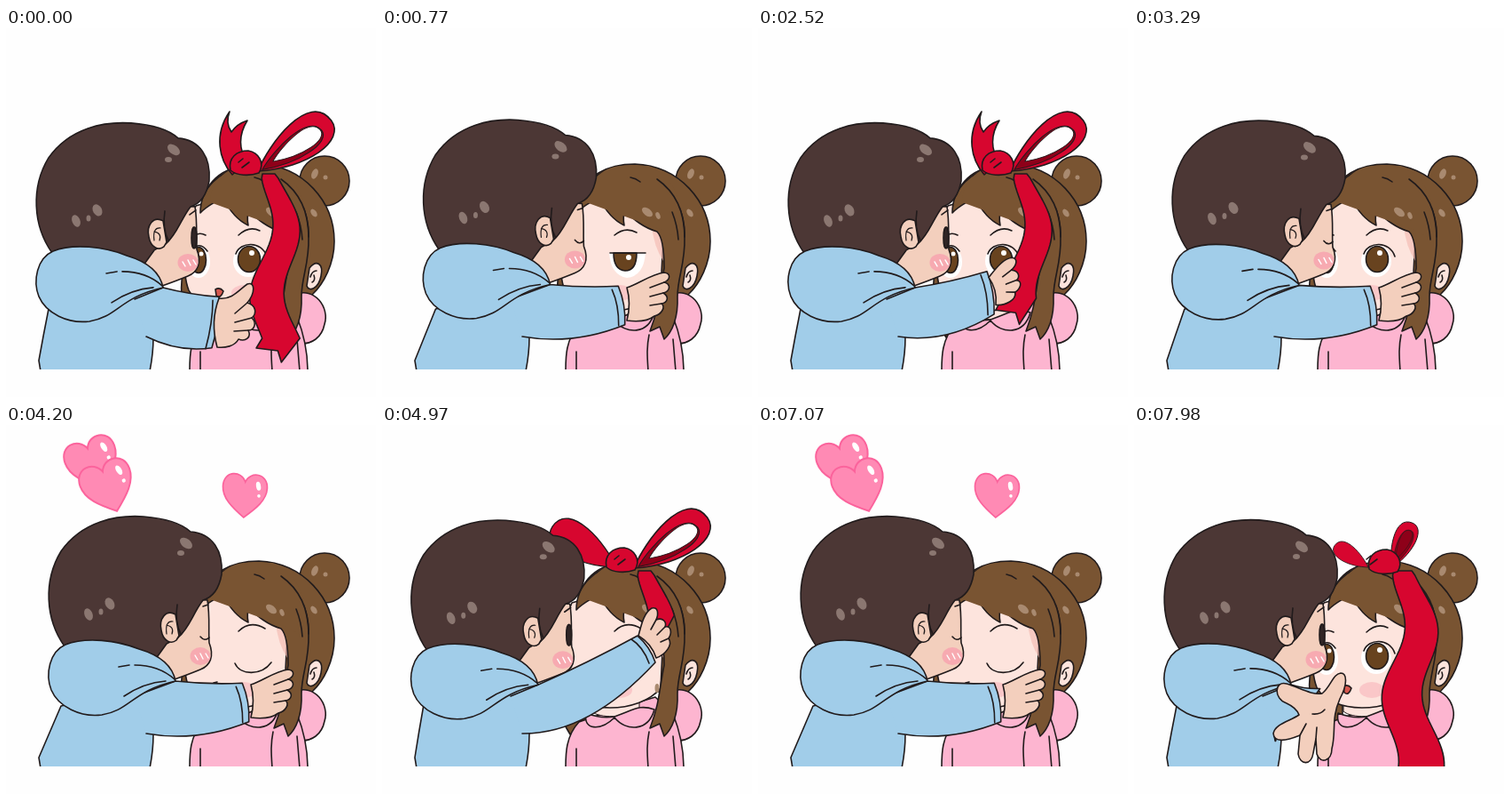
Animation, 417 px wide and 415 px high, one loop 8 s. Source, as an HTML page:

```html
<!DOCTYPE html>
<html lang="en">
<head>
<meta charset="utf-8">
<title>Ribbon kiss</title>
<style>
html, body { margin: 0; width: 100%; height: 100%; overflow: hidden; background: #fefefe; }
svg { display: block; width: 100%; height: 100%; }
.ink { stroke: #211b1c; stroke-width: 1.6; stroke-linejoin: round; stroke-linecap: round; }
.line { fill: none; }
.hair { fill: #795432; }
.dark { fill: #4c3735; }
.skin { fill: #f3cfbd; }
.pale { fill: #fde4dd; }
.pink { fill: #fdb5d0; }
.blue { fill: #a1cde9; }
.red { fill: #d7062f; }
.wine { fill: #8e0019; }
.shine { fill: #a98a70; }
.gloss { fill: #8b7771; }
.blush { fill: #f7a3af; }
</style>
</head>
<body>
<svg viewBox="0 0 417 415">
<defs>
  <clipPath id="floor"><rect width="417" height="384"/></clipPath>
  <g id="heart">
    <path d="M0 25C-14 14-25 4-25-9C-25-27-5-28 0-15C5-28 25-26 25-9C25 4 14 14 0 25Z" fill="#ff8ab4" stroke="#fb639c" stroke-width="1.7"/>
    <ellipse cx="15" cy="-11" rx="2.6" ry="5" fill="#fff" transform="rotate(-12 15 -11)"/>
    <circle cx="16" cy="0" r="1.8" fill="#fff"/>
  </g>
  <path id="leaf" d="M0 0C25-20 95-50 100-8C103 20 50 25 0 0Z"/>
</defs>
<g clip-path="url(#floor)">
  <g id="girl" class="ink">
    <path class="hair" d="M200 270C194 300 200 330 212 348L235 330V270Z"/>
    <circle class="hair" cx="359" cy="172" r="28"/>
    <path class="hair" d="M222 195C228 165 255 153 285 153C335 155 370 195 370 240C370 265 358 288 345 300H300L230 240Z"/>
    <path class="pink" d="M325 300C348 290 365 315 359 333C356 348 345 356 330 355Z"/>
    <path class="pink" d="M222 334C207 350 207 370 207 386H340C340 365 336 345 328 325L308 306L262 320Z"/>
    <path class="pale" d="M236 304V322C245 330 275 330 290 320V300Z" stroke-width="1"/>
    <path class="pink" d="M230 324C226 344 247 344 262 329C275 345 300 345 307 320C290 314 285 320 262 328C250 330 240 328 230 324Z"/>
    <path class="line" d="M219 364V386M301 345C298 360 299 370 300 386M328 350L331 386"/>
    <path class="pale" d="M214 200C200 230 198 275 206 295C222 326 290 325 314 296L318 215L265 185Z"/>
    <g stroke="none">
      <ellipse class="blush" cx="268" cy="298" rx="14" ry="9" opacity=".45"/>
      <path d="M304 222L318 230L317 262Q306 245 304 222Z" fill="#f4bdb5" opacity=".7"/>
    </g>
    <g id="eyesOpen">
      <ellipse cx="273" cy="262" rx="17" ry="18" fill="#fff" stroke="none"/>
      <ellipse cx="217" cy="263" rx="13" ry="18" fill="#fff" stroke="none"/>
      <ellipse cx="274" cy="260" rx="12.5" ry="14.5" fill="#68431f"/>
      <ellipse cx="217" cy="261" rx="8.5" ry="14.5" fill="#68431f"/>
      <circle cx="277" cy="253" r="3" fill="#fff" stroke="none"/>
      <circle cx="220" cy="254" r="2.5" fill="#fff" stroke="none"/>
      <path class="line" d="M259 254C264 240 288 239 294 257M209 250Q218 239 227 251M262 233Q274 222 286 228M211 234Q218 229 225 233"/>
      <path id="mouth" d="M236 294Q241 291 245 296Q242 305 237 301Z" fill="#d5574e"/>
    </g>
    <g id="eyesHalf">
      <path d="M256 253H297Q295 279 276 281Q258 278 256 253Z" fill="#fff" stroke="none"/>
      <path d="M261 253H287Q287 273 274 273Q261 272 261 253Z" fill="#68431f"/>
      <circle cx="278" cy="258" r="3" fill="#fff" stroke="none"/>
      <path class="line" d="M257 253H297M262 233Q274 223 287 230"/>
    </g>
    <path id="eyesClosed" class="line" d="M258 268C264 282 288 282 299 267M262 232Q275 219 292 229M234 290L238 289"/>
    <path class="pale" d="M342 270C350 260 358 265 355 279C352 294 341 297 339 290Z"/>
    <path class="line" d="M343 280Q345 273 350 273M345 286Q349 284 347 278"/>
    <path class="hair" d="M219 208C219 180 240 160 270 157C325 158 342 205 341 235C342 265 333 280 333 302C334 326 327 342 318 350L313 336L302 341C313 312 312 300 318 270C318 250 316 235 310 229C296 225 282 215 274 205Q271 213 273 222C258 215 250 202 244 190C237 196 227 199 219 208Z"/>
    <path d="M230 196C230 178 245 155 272 155H300C325 162 340 190 339 235L331 236L318 228Z" fill="#795432" stroke="none"/>
    <path class="line" d="M280 168Q286 169 291 173M310 170C330 184 341 205 341 235M327 207Q333 222 334 238"/>
    <g class="shine" stroke="none">
      <ellipse cx="299" cy="207" rx="7" ry="4" transform="rotate(38 299 207)"/>
      <ellipse cx="311" cy="211" rx="2.5" ry="4" transform="rotate(-20 311 211)"/>
      <ellipse cx="348" cy="164" rx="3.5" ry="6" transform="rotate(22 348 164)"/>
      <circle cx="360" cy="168" r="2.5"/>
      <ellipse cx="347" cy="208" rx="3" ry="5" transform="rotate(-35 347 208)"/>
      <ellipse cx="310" cy="296" rx="2.5" ry="5"/>
    </g>
  </g>

  <g id="ribbon" class="ink">
    <path id="tail" class="red"/>
    <g id="bow">
      <use id="leftLoop" href="#leaf" class="red"/>
      <path id="streamer" class="red" d="M255 165C240 148 234 120 252 94Q247 107 254 117Q260 108 272 104C262 120 262 137 272 150Z"/>
      <g id="rightLoop">
        <use href="#leaf" class="red"/>
        <use href="#leaf" class="wine" transform="translate(5 1) scale(.8 .6)"/>
        <use href="#leaf" id="hole" transform="translate(20 -1) scale(.64 .48)"/>
      </g>
      <path id="knot" class="red" d="M253 160C250 146 260 138 273 138C285 140 292 152 285 163C274 167 260 166 253 160Z"/>
      <path class="line" d="M262 151L267 147M266 157L274 151"/>
    </g>
  </g>

  <g id="head" class="ink">
    <path class="skin" d="M175 195L227 197C230 215 228 230 229 245C235 260 230 271 219 275Q207 280 190 286L140 250Z"/>
    <g stroke="none">
      <ellipse class="blush" cx="219" cy="260" rx="11.5" ry="10" opacity=".85"/>
      <path d="M213 259L216 264M219 257L222 263M225 257L228 262" stroke="#fff" stroke-width="1.4"/>
    </g>
    <path id="boyClosed" class="line" d="M219 238Q224 244 229 239M222 204L228 202"/>
    <g id="boyOpen"><ellipse cx="226" cy="232" rx="3" ry="12" fill="#302525"/><path class="line" d="M221 206L228 201"/></g>
    <path class="dark" d="M66 249C44 218 42 175 62 142C86 108 125 101 155 103C181 105 199 112 208 120C233 122 245 142 243 168C240 185 232 194 222 197C211 211 207 228 194 239L181 246L168 264L150 255Z"/>
    <path class="line" d="M193 202Q190 222 197 235"/>
    <path class="skin" d="M191 213C180 207 172 218 175 231C177 243 186 247 192 242L195 237Z"/>
    <path class="line" d="M188 221Q179 220 181 235M181 225Q190 227 187 235" stroke-width="1.2"/>
    <g class="gloss" stroke="none">
      <ellipse cx="203" cy="133" rx="8" ry="5" transform="rotate(38 203 133)"/>
      <ellipse cx="197" cy="144" rx="4" ry="3"/>
      <ellipse cx="93" cy="213" rx="4.5" ry="7" transform="rotate(-22 93 213)"/>
      <ellipse cx="107" cy="210" rx="2.5" ry="3.5"/>
      <ellipse cx="117" cy="201" rx="5" ry="7" transform="rotate(-28 117 201)"/>
    </g>
  </g>
  <g class="ink">
    <path id="torso" class="blue"/>
    <path id="sleeve" class="blue"/>
    <path id="cuff" class="line"/>
    <g id="hood">
      <path class="blue" d="M67 247C49 255 44 280 51 298C59 317 84 329 108 326C140 321 142 299 191 288C187 267 167 257 150 252C125 242 90 238 67 247Z"/>
      <path class="line" d="M127 272L139 270M145 270Q172 270 190 286M133 305Q155 290 180 288"/>
    </g>
    <g id="hand">
      <g id="handGrip">
        <path class="skin" d="M240 304C255 306 263 294 272 288C281 285 281 298 272 309C282 312 283 321 277 326C283 332 280 340 273 340C277 348 270 353 262 350C258 358 247 360 238 359Q230 330 240 304Z"/>
        <path class="line" d="M272 309L258 321M277 326L258 331M273 340L257 341"/>
      </g>
      <g id="handOpen">
        <path class="skin" d="M172 291C158 287 157 308 172 313Q183 318 186 326C176 333 159 336 157 347C158 358 172 355 187 349L185 370C187 383 200 383 202 369L205 353L206 370C210 382 223 378 223 364C228 345 222 330 232 308C241 291 240 279 233 279C224 280 222 294 212 302C200 304 186 295 172 291Z"/>
        <path class="line" d="M187 349L194 336M205 353L206 340M201 325Q210 326 215 320"/>
      </g>
      <g id="handCheek">
        <path class="skin" d="M276 292C289 288 303 277 318 275C326 276 325 283 318 286C326 288 325 296 317 298C324 302 322 309 315 310C320 314 315 322 307 324C298 331 284 330 276 329Q281 310 276 292Z"/>
        <path class="line" d="M318 286L302 292M317 298L302 302M315 310L302 312"/>
      </g>
      <g id="handUp">
        <path class="skin" d="M289 237C292 226 295 211 304 206C311 204 312 212 309 219C317 216 321 222 319 227C326 225 327 234 323 240C328 247 320 258 309 262Q304 246 289 237Z"/>
        <path class="line" d="M309 219L303 230M319 227L310 236M323 240L314 244"/>
      </g>
    </g>
  </g>
</g>
<g id="hearts">
  <use href="#heart"/>
  <use href="#heart"/>
  <use href="#heart"/>
</g>
</svg>
<script>
const LOOP = 8000, CYCLE = 2625, STEP = 70;
const el = id => document.getElementById(id);
const set = (id, name, value) => el(id).setAttribute(name, value);
const show = (id, on) => { el(id).style.display = on ? '' : 'none'; };
const mix = (a, b, k) => a + (b - a) * k;

// Eased progress from 0 to 1 between two times.
function ramp(t, from, to) {
  const k = Math.min(1, Math.max(0, (t - from) / (to - from)));
  return k * k * (3 - 2 * k);
}

// A waving band that widens downwards and ends in a swallowtail.
function band(end, drift) {
  const top = 164;
  const centre = y => 305 + drift + 11 * Math.sin((y - 187 - drift * .6) / 24);
  const half = y => 7 + drift * .4 + 1.05 * Math.sqrt(y - top);
  const left = [], right = [];
  for (let y = top; y <= end; y += 5) {
    right.push([centre(y) + half(y), y]);
    left.unshift([centre(y) - half(y), y]);
  }
  const x = centre(end);
  const fork = [[x, end + 26], [x - 4, end + 13], [x - half(end) - 7, end + 10]];
  return 'M' + [...right, ...fork, ...left].join('L') + 'Z';
}

function drawRibbon(t) {
  const s = t >= 2150 ? t - CYCLE : t;
  show('ribbon', s < 430);
  show('bow', s < 220);
  const pull = ramp(s, -280, 0), undo = ramp(s, 0, 105), fall = ramp(s, 105, 430);
  set('tail', 'd', band(mix(215, 350, pull) + 42 * undo, 8 * undo));
  set('tail', 'transform', `translate(${52 * fall} ${250 * fall})`);

  const streaming = s > -140 && s < 60;
  show('streamer', streaming);
  show('leftLoop', !streaming);
  const leftSize = mix(.85, .45, undo);
  set('leftLoop', 'transform', `translate(264 160) rotate(28) scale(${-leftSize} ${leftSize})`);
  set('rightLoop', 'transform', `translate(${284 + 6 * undo} 161) rotate(${mix(-30, -60, undo)}) scale(${mix(1, .56, undo)})`);
  set('knot', 'transform', `translate(${12 * undo} ${2 * undo})`);
  set('hole', 'fill', undo < .5 ? '#fefefe' : '#8e0019');
  const size = 1 - ramp(s, 105, 220);
  set('bow', 'transform', `translate(${288 * (1 - size)} ${160 * (1 - size)}) scale(${size})`);
}

// Where the cuff is in each pose: centre, tilt in radians, half width.
const poses = {
  Grip: [236, 331, .14, 29],
  Open: [185, 324, .73, 37],
  Cheek: [270, 312, -.17, 22],
  Up: [298, 252, -.59, 18]
};
const moves = [
  ['Grip', 'Open', 0, 105], ['Open', 'Cheek', 200, 450], ['Cheek', 'Grip', 1930, 2130],
  ['Grip', 'Up', 2130, 2320], ['Up', 'Grip', 2390, CYCLE]
];

function drawArm(t, lean) {
  const [from, to, start, end] = moves.filter(m => m[2] <= t).pop();
  const k = ramp(t, start, end);
  const [x, y, tilt, half] = poses[from].map((v, i) => mix(v, poses[to][i], k));
  const dx = half * Math.sin(tilt), dy = half * Math.cos(tilt);
  const top = [x + dx, y - dy], bottom = [x - dx, y + dy];
  const shoulder = [191 + lean, 288 - lean * .28];
  const bulge = [x + 5 * Math.cos(tilt), y + 5 * Math.sin(tilt)];
  const sag = 12 + Math.max(0, 347 - bottom[1]) * .36;
  set('sleeve', 'd', `M145 305L${shoulder}Q${(shoulder[0] + top[0]) / 2} ${(shoulder[1] + top[1]) / 2 + 3} ${top}`
    + `Q${bulge} ${bottom}Q${(158 + bottom[0]) / 2} ${(347 + bottom[1]) / 2 + sag} 158 347`);
  set('cuff', 'd', `M${top[0] - 7} ${top[1] + 4}Q${bulge[0] - 8} ${bulge[1]} ${bottom[0] - 7} ${bottom[1] + 1}`);

  const pose = k < .6 ? from : to;
  for (const name in poses) show('hand' + name, name === pose);
  show('cuff', pose !== 'Open');
  const [px, py, pTilt] = poses[pose];
  set('hand', 'transform', `translate(${x} ${y}) rotate(${(tilt - pTilt) * 57.3}) translate(${-px} ${-py})`);
}

function drawBoy(t) {
  const lean = -14 + 14 * ramp(t, 350, 880) - 31 * ramp(t, 1930, 2170) + 17 * ramp(t, 2170, 2380);
  const move = `translate(${lean} ${-lean * .28})`;
  set('head', 'transform', move);
  set('hood', 'transform', move);
  set('torso', 'd', `M${62 + lean} 316Q${49 + lean * .5} 346 37 374L39 386H162Q166 366 166 348L176 292Z`);
  const closed = t >= 520 && t < 2050;
  show('boyClosed', closed);
  show('boyOpen', !closed);
  drawArm(t, lean);
}

function drawFaceAndHearts(t) {
  const open = t < 735 || t >= 2480;
  const half = t >= 735 && t < 820;
  show('eyesOpen', open);
  show('eyesHalf', half);
  show('eyesClosed', !open && !half);
  show('mouth', t < 350 || t >= 2480);
  show('hearts', t >= 820 && t < 1950);
  const size = mix(.5, 1, ramp(t, 820, 980));
  [[98, 43, -20, 1.18], [115, 69, -20, 1.18], [269, 79, 3, 1]].forEach(([x, y, turn, scale], i) =>
    el('hearts').children[i].setAttribute('transform',
      `translate(${x} ${y + 12 * (1 - size)}) rotate(${turn}) scale(${scale * size})`));
}

function frame(now) {
  const time = Math.floor((now % LOOP) / STEP) * STEP;
  const t = time % CYCLE;
  drawRibbon(t);
  drawBoy(t);
  drawFaceAndHearts(t);
  requestAnimationFrame(frame);
}
frame(0);
</script>
</body>
</html>
```
